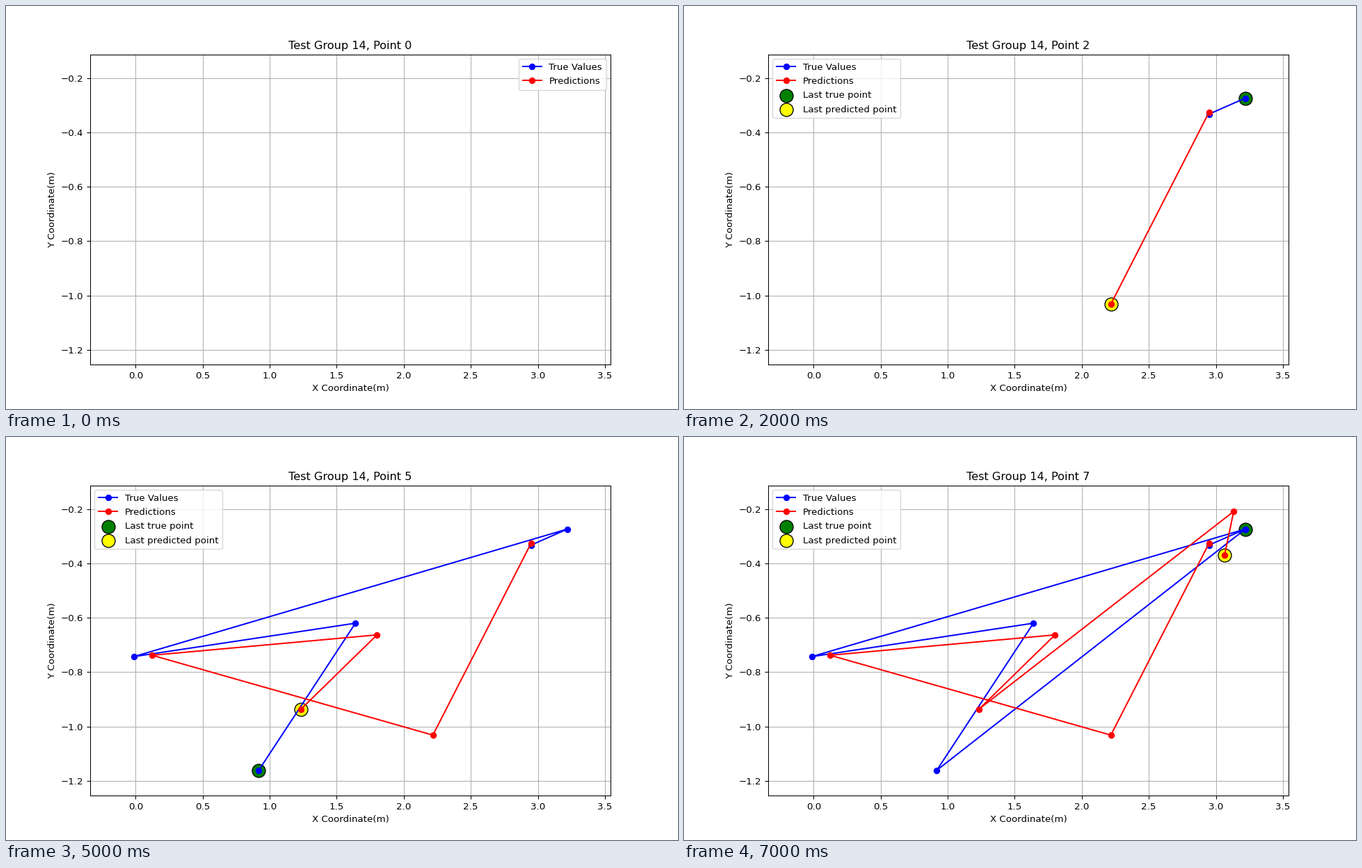
Write a matplotlib script that moves like this. It is 966 px wide and 580 px high and loops after 8000 ms.

```python
import matplotlib.pyplot as plt
from matplotlib.animation import FuncAnimation

WIDTH, HEIGHT, DPI = 966, 580, 96.6
GROUP = 14

# The real path revisits its second stop and rests there.
start, corner = (2.949, -0.3325), (3.22, -0.2735)
true_path = [start, corner, (-0.014, -0.743), (1.639, -0.62),
             (0.918, -1.1615), corner, corner]
pred_path = [(2.949, -0.326), (2.217, -1.032), (0.122, -0.738), (1.8, -0.663),
             (1.234, -0.936), (3.133, -0.2085), (3.065, -0.3695)]

# The tiny margin keeps the pixel size from rounding down.
fig, ax = plt.subplots(
    figsize=((WIDTH + 1e-6) / DPI, (HEIGHT + 1e-6) / DPI), dpi=DPI)


def draw_path(points, n, color, label):
    xs = [x for x, _ in points[:n]]
    ys = [y for _, y in points[:n]]
    ax.plot(xs, ys, marker="o", color=color, label=label)


def mark_last(point, color, label):
    ax.scatter(*point, s=200, c=color, edgecolors="black", label=label)


def update(n):
    ax.clear()
    ax.set_xlim(-0.341, 3.5443)
    ax.set_ylim(-1.255, -0.1125)
    draw_path(true_path, n, "blue", "True Values")
    draw_path(pred_path, n, "red", "Predictions")
    if n:
        mark_last(true_path[n - 1], "green", "Last true point")
        mark_last(pred_path[n - 1], "yellow", "Last predicted point")
    ax.set_title(f"Test Group {GROUP}, Point {n}")
    ax.set_xlabel("X Coordinate(m)")
    ax.set_ylabel("Y Coordinate(m)")
    ax.legend(loc="upper left" if n else "upper right",
              labelspacing=0.54, borderpad=0.42)
    ax.grid(True)
    return []


anim = FuncAnimation(fig, update, frames=len(true_path) + 1, interval=1000,
                     init_func=lambda: update(0), repeat=True, repeat_delay=0)
plt.show()
```
